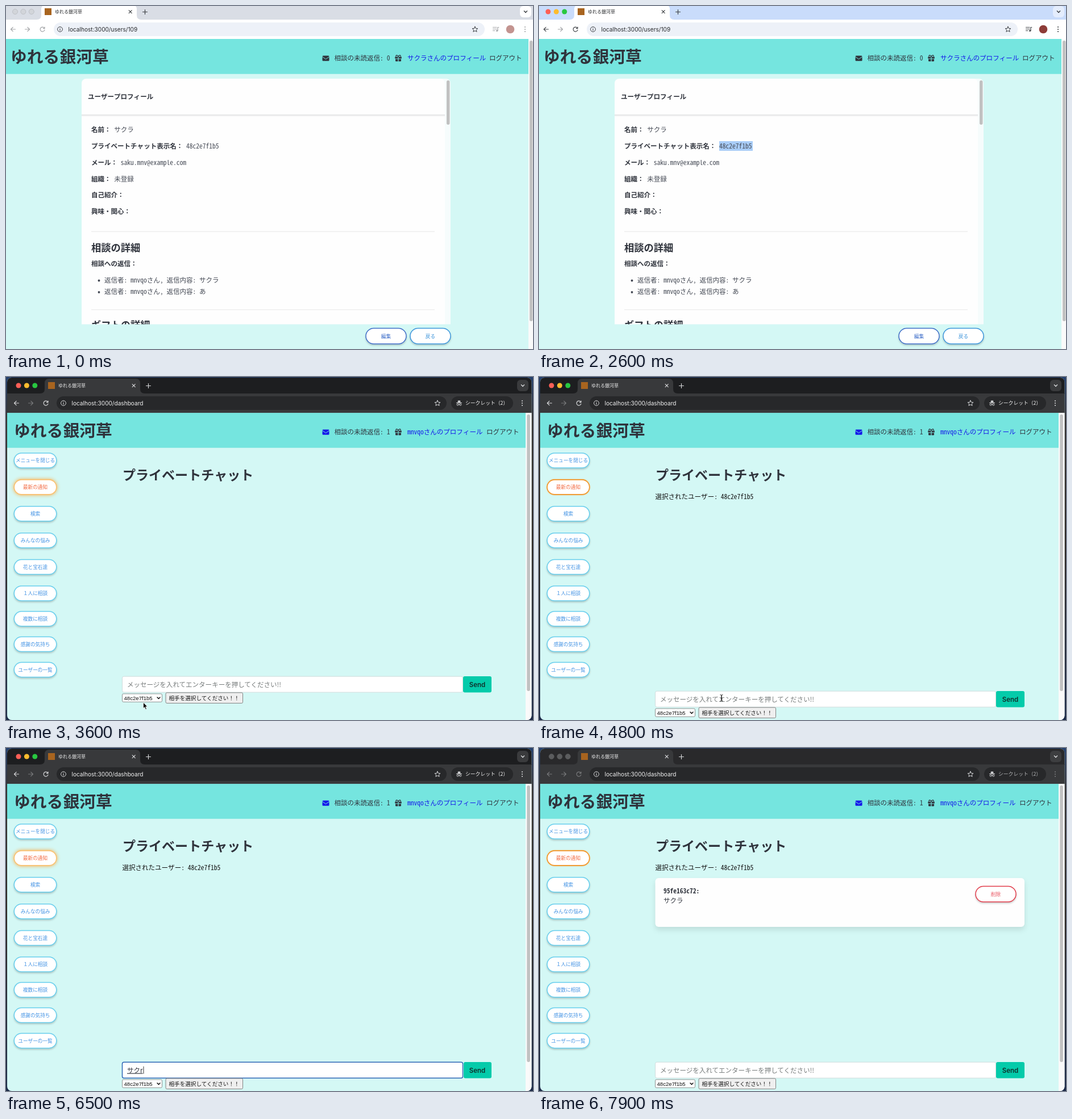
Recreate the animation shown at these times as an HTML page. Size 927x604 px, loop 8000 ms.

```html
<!DOCTYPE html>
<html lang="ja">
<head>
<meta charset="utf-8">
<title>プライベートチャット</title>
<style>
html, body { margin: 0; width: 100%; height: 100%; overflow: hidden; }
svg { display: block; font-family: 'Noto Sans Mono CJK JP', 'Noto Sans CJK JP', 'Noto Sans CJK', sans-serif; }
.ui { font-family: Inter, 'Noto Sans CJK JP', 'Noto Sans CJK', sans-serif; }
.prop { font-family: 'Noto Sans CJK JP', 'Noto Sans CJK', sans-serif; }
.form { font-family: 'Liberation Sans', 'Noto Sans CJK JP', sans-serif; }
.b { font-weight: 700; }
.semi { font-weight: 600; }
.mid { text-anchor: middle; }
.ime { text-decoration: underline; }
.shade { filter: drop-shadow(0 2px 1.5px #0003); }
.lift { filter: drop-shadow(0 5px 5px #0a0a0a1c); }
</style>
</head>
<body>
<svg id="stage" width="927" height="604" viewBox="0 0 927 604"></svg>
<script>
const LOOP = 8000, EM = 11.52;
const SITE = 'ゆれる銀河草', GUEST = 'サクラ', HOST = 'mnvqo';
const GUEST_ID = '48c2e7f1b5', HOST_ID = '95fe163c72', MAIL = 'saku.mnv@example.com';
const INK = '#2f333c', BODY = '#444954', PAGE = '#d4f8f5', BAR = '#75e5df', LINK = '#1519ea';

const rect = (x, y, w, h, fill, r = 0, more = '') =>
  `<rect x="${x}" y="${y}" width="${w}" height="${h}" rx="${r}" fill="${fill}" ${more}/>`;
const dot = (x, y, r, fill, more = '') => `<circle cx="${x}" cy="${y}" r="${r}" fill="${fill}" ${more}/>`;
const line = (d, color, w = 1.2) =>
  `<path d="${d}" fill="none" stroke="${color}" stroke-width="${w}" stroke-linecap="round" stroke-linejoin="round"/>`;
const shape = (d, fill, more = '') => `<path d="${d}" fill="${fill}" ${more}/>`;
const move = (x, y, body) => `<g transform="translate(${x} ${y})">${body}</g>`;
// Text is placed by the middle of its line.
const text = (x, cy, str, size = EM, fill = INK, cls = '') =>
  `<text x="${x}" y="${cy + size * 0.38}" font-size="${size}" fill="${fill}" class="${cls}">${str}</text>`;

const pill = (x, y, w, h, label, edge, ink) =>
  rect(x, y, w, h, '#fff', h / 2, `stroke="${edge}" stroke-width="1.5" class="shade"`) +
  text(x + w / 2, y + h / 2, label, 8.64, ink, 'mid');

const LIGHT = {
  strip: ['#d9dde5', '#c9dcfb'], tab: '#fff', tool: '#fff', field: '#edf1f8', ink: '#3c3f43',
  text: '#26282b', weak: ['#a3a5a8', '#45484c'], off: '#a3a5a8', lamp: '#d2d5da', rim: '#b4b7bc', box: ['#fff', '#e4edfd']
};
const DARK = {
  strip: ['#29292b', '#1d1e20'], tab: '#38393b', tool: '#38393b', field: '#27282a', ink: '#d5d6d8',
  text: '#f0f0f0', weak: ['#77787a', '#d5d6d8'], off: '#77787a', lamp: '#5b5c5e', rim: '#5b5c5e', box: ['#3d3e40', '#3a3b3d']
};

function browserLeft(c, on) {
  const lamps = ['#fe5f57', '#febc2e', '#28c840'].map((f, i) =>
    dot(16 + i * 14.4, 10, 4.5, on ? f : c.lamp, on ? '' : `stroke="${c.rim}" stroke-width=".7"`)).join('');
  return shape('M54 24q8 0 8-8V6q0-8 8-8h152q8 0 8 8v10q0 8 8 8z', c.tab) + lamps +
    rect(68, 4, 12, 12, '#a8641f') +
    text(86, 10, SITE, 8, c.text, 'prop') +
    line('M216.2 7.7l5 5m0-5l-5 5M240.5 10.5h8m-4-4v8', c.ink) +
    line('M16.5 41h-8m3.7-3.7l-3.7 3.7l3.7 3.7', c.weak[on]) +
    line('M33.5 41h8m-3.7-3.7l3.7 3.7l-3.7 3.7', c.off) +
    line('M67.6 39a4 4 0 1 0 .4 3.2M68 37v2.6h-2.6', c.weak[on]);
}

const address = (c, url) => dot(95, 41, 4.4, 'none', `stroke="${c.ink}"`) +
  line('M95 40.8v2.2M95 38.8v.1', c.ink) + text(109.5, 41, url, 10.1, c.text, 'ui');

const star = (x, y, color) => move(x, y,
  line('M0-4.8L1.4-1.6L4.9-1.3L2.3 1L3.1 4.4L0 2.6L-3.1 4.4L-2.3 1L-4.9-1.3L-1.4-1.6Z', color, 1));
const menuDots = (x, y, color) => [-4, 0, 4].map(d => dot(x, y + d, 1.1, color)).join('');
const chevron = (x, y, bg, color) => rect(x - 10, y - 10, 20, 20, bg, 6) +
  line(`M${x - 2.6} ${y - 1.2}l2.6 2.6l2.6-2.6`, color, 1.4);

function siteNav(y, count, user, envelope, logoutX) {
  const mail = rect(-6, -4.6, 12, 9.4, envelope, 1.5) + line('M-6-2.6L0 1.6L6-2.6', BAR, 1);
  const gift = shape('M-5.8-2.4h5.2v3h-5.2zM.6-2.4h5.2v3h-5.2zM-5 1.4h4.4v4.2H-4q-1 0-1-1zM.6 1.4H5v3.2q0 1-1 1H.6z', INK) +
    line('M0-2.6C-1-6-4.6-6.2-4-3.4M0-2.6C1-6 4.6-6.2 4-3.4', INK, 1.3);
  return move(562.5, y, mail) + text(577.5, y, '相談の未読返信: ' + count) + move(690, y, gift) +
    text(706, y, user + 'さんのプロフィール', EM, LINK) + text(logoutX, y, 'ログアウト');
}

function profile(t) {
  const on = +(t >= 1500), c = LIGHT;
  const row = (y, label, value = '') => text(150, y, label + '：', EM, INK, 'b') +
    text(150 + EM * (label.length + 1.5), y, value, EM, BODY);
  const reply = (y, body) => dot(163.5, y + 1, 1.9, BODY) +
    text(173, y, `返信者: ${HOST}さん, 返信内容: ${body}`, EM, BODY);
  return rect(0, 0, 927, 604, PAGE) +
    rect(0, 0, 927, 24, c.strip[on]) + rect(0, 24, 927, 34, c.tool) + rect(84, 29, 758, 24, c.field, 12) +
    browserLeft(c, on) + address(c, 'localhost:3000/users/109') +
    chevron(914, 10, c.box[on], c.ink) + star(825, 41, c.ink) +
    line('M856.5 37.5h6.5M856.5 40.5h6.5M856.5 43.5h3.5M865 43.5v-6h1.8', c.weak[on]) + dot(863.6, 43.5, 1.6, c.weak[on]) +
    dot(887, 41, 7.3, on ? '#8d3c38' : '#c39490') + menuDots(913, 41, c.weak[on]) +
    rect(0, 58, 919, 61.7, BAR) + rect(919, 58, 8, 546, '#fafafa') + rect(921, 61, 5.5, 494, '#c1c1c1', 2.7) +
    text(8, 89, SITE, 28.8, INK, 'b') + siteNav(92, 0, GUEST, INK, 850) +
    rect(140, 128, 642, 440, '#f6fcfc', 8) + rect(133, 128, 639, 440, '#fefefe', 8) +
    rect(775, 131, 5.5, 78, '#c1c1c1', 2.7) +
    rect(133, 191, 639, 2, '#e6e7e8') + rect(133, 193, 639, 1.5, '#f5f5f6') +
    text(144, 160, 'ユーザープロフィール', EM, INK, 'b') +
    (t >= 1800 ? rect(317, 238, 59, 17, '#a9cdf8') : '') +
    row(217.5, '名前', GUEST) + row(246.5, 'プライベートチャット表示名', GUEST_ID) + row(275.5, 'メール', MAIL) +
    row(304.5, '組織', '未登録') + row(333, '自己紹介') + row(362, '興味・関心') +
    rect(150, 396.5, 604, 1.4, '#ededed') + text(150, 425, '相談の詳細', 17.28, INK, 'b') +
    row(453.5, '相談への返信') + reply(482.5, GUEST) + reply(503, 'あ') +
    rect(150, 534, 604, 1.4, '#ededed') + text(150, 561, 'ギフトの詳細', 17.28, INK, 'b') +
    rect(133, 560.5, 650, 44, PAGE) +
    pill(633, 567.5, 71, 27.5, '編集', '#3f6fc9', '#3a6bc8') + pill(711, 567.5, 71, 27.5, '戻る', '#3d97dc', '#3a93da');
}

const MENU = ['メニューを閉じる', '最新の通知', '検索', 'みんなの悩み', '花と宝石達', '１人に相談', '複数に相談', '感謝の気持ち', 'ユーザーの一覧'];

function menuButton(label, i, t) {
  const y = i < 5 ? 134 + i * 46.9 : 368 + (i - 5) * 44.8;
  if (i != 1) return pill(14.3, y, 74.5, 26, label, '#68cfee', '#4393e4');
  const glow = 0.5 + 0.5 * Math.cos((t - 3500) / 3000 * 2 * Math.PI);
  const halo = `style="filter:drop-shadow(0 0 ${1 + 2 * glow}px rgba(255,165,50,${0.6 + 0.3 * glow}))"`;
  return rect(14.3, y, 74.5, 26, '#fff', 13, `stroke="rgb(${242 + 8 * glow},${146 + 48 * glow},${35 + 80 * glow})" stroke-width="1.6" ${halo}`) +
    text(51.5, y + 13, label, 8.64, '#f2683f', 'mid');
}

const TYPING = [[5700, 's'], [5850, 'サ'], [6100, 'サk'], [6250, 'サク'], [6450, 'サクr'], [6650, GUEST], [7250, '']];

function composer(t) {
  const cy = t < 4600 ? 541.2 : 567.2, focus = t >= 5200 && t < 7700;
  const typed = (TYPING.filter(k => t >= k[0]).pop() || [0, ''])[1];
  const width = [...typed].reduce((w, ch) => w + (ch < '~' ? 5 : EM), 0);
  return rect(204.5, cy - 14, 599, 28, '#fff', 3, `stroke="${focus ? '#2d66b5' : '#cfdcdc'}" stroke-width="${focus ? 1.5 : 1}"`) +
    rect(focus ? 805 : 804, cy - 14.2, focus ? 49 : 50, 28.6, '#04cbaa', 3) + text(829, cy, 'Send', 11.5, '#10302c', 'ui semi mid') +
    (typed ? text(213, cy, typed, EM, INK, 'prop' + (t < 6950 ? ' ime' : ''))
      : text(213, cy, 'メッセージを入れてエンターキーを押してください!!', EM, '#767b7b', 'prop')) +
    (focus && (typed || t % 1000 < 500) ? rect(213.5 + width, cy - 6.5, 0.9, 13, '#222') : '') +
    rect(204.5, cy + 16.7, 70, 14.3, '#fff', 2, 'stroke="#767676" stroke-width=".8"') +
    text(207.5, cy + 23.8, GUEST_ID, 9.6, '#111', 'form') + line(`M266 ${cy + 22.8}l2.5 2.5l2.5-2.5`, '#111', 1.5) +
    rect(281, cy + 14.7, 135.5, 18.5, '#efefef', 2, 'stroke="#767676" stroke-width=".9"') +
    text(286.5, cy + 23.8, '相手を選択してください！！', 9.6, '#111', 'prop');
}

const message = () => rect(204.5, 229, 649.5, 86, '#fefefe', 6, 'class="lift"') +
  text(219, 252, HOST_ID + ':', EM, INK, 'b') + text(219, 268.5, GUEST, EM, INK) +
  pill(768, 243.5, 71, 27.5, '削除', '#e23c4b', '#e8505d');

function wallpaper() {
  return '<linearGradient id="wall" x2="0" y2="1"><stop stop-color="#24406e"/><stop offset=".12" stop-color="#33302f"/>' +
    '<stop offset=".5" stop-color="#2a2420"/><stop offset="1" stop-color="#1c2a48"/></linearGradient>' +
    rect(0, 0, 927, 604, 'url(#wall)');
}

function chat(t) {
  const on = +(t < 7700), c = DARK;
  const spy = shape('M-2.6-1.2L-2-4.4h4l.6 3.2zM-5-1H5V0H-5z', c.ink) +
    dot(-2.4, 2.5, 1.6, 'none', `stroke="${c.ink}"`) + dot(2.4, 2.5, 1.6, 'none', `stroke="${c.ink}"`) + line('M-.8 2.3h1.6', c.ink, 1);
  return wallpaper() +
    '<clipPath id="win"><rect x="2" y="1" width="922.5" height="603" rx="8"/></clipPath><g clip-path="url(#win)">' +
    rect(2, 1, 923, 603, PAGE) + rect(2, 1, 923, 29, c.strip[on]) + rect(2, 29, 923, 34.5, c.tool) +
    rect(89, 34, 686, 24, c.field, 12) + rect(783, 34, 109, 24, c.field, 12) +
    move(6, 5, browserLeft(c, on) + address(c, 'localhost:3000/dashboard')) +
    chevron(909, 15, c.box[on], c.ink) + star(759, 46, c.ink) + move(797, 46, spy) +
    text(808, 46, 'シークレット（2）', 8.8, on ? c.text : '#b0b1b3', 'prop') + menuDots(908, 46, c.weak[on]) +
    rect(2, 63.2, 912, 61.5, BAR) + rect(914, 63.2, 11, 541, '#fafafa') + rect(916.3, 66, 5.5, 487, '#c1c1c1', 2.7) +
    text(14, 94, SITE, 28.8, INK, 'b') + siteNav(97, 1, HOST, LINK, 845) +
    MENU.map((label, i) => menuButton(label, i, t)).join('') +
    text(205, 172.5, 'プライベートチャット', 23.04, INK, 'b') +
    (t >= 4600 ? text(204.5, 211, '選択されたユーザー: ' + GUEST_ID, EM, '#111') : '') +
    (t >= 7300 ? message() : '') + composer(t) + '</g>';
}

// Pointer paths: [time, x, y]
const PATHS = [
  [[950, 420, 380], [1150, 322, 262], [1300, 322, 262], [1550, 346, 246], [2300, 346, 246]],
  [[2900, 380, 480], [3400, 241.5, 573], [3800, 241.5, 573], [4200, 345, 566], [4550, 345, 566], [4750, 321, 565], [5600, 321, 565]]
];

function pointer(t) {
  for (const path of PATHS) for (let i = 1; i < path.length; i++) {
    const [t0, x0, y0] = path[i - 1], [t1, x1, y1] = path[i];
    if (t < t0 || t >= t1) continue;
    const u = (t - t0) / (t1 - t0), e = u * u * (3 - 2 * u);
    const beam = (t > 1480 && t < 2400) || t > 4680;
    return move(x0 + (x1 - x0) * e, y0 + (y1 - y0) * e, beam
      ? line('M-2-5.5q2 0 2 1.5v8q0 1.5-2 1.5M2-5.5q-2 0-2 1.5v8q0 1.5 2 1.5M-1.2 1.5h2.4', '#222', 1)
      : shape('M0 0v10.6l2.4-2.2l1.7 4l1.8-.8l-1.7-3.9h3.2z', '#000', 'stroke="#fff" stroke-width=".8"'));
  }
  return '';
}

const stage = document.getElementById('stage');
let shown = '';
function draw(now) {
  const t = now % LOOP;
  const next = (t < 2700 ? profile(t) : chat(t)) + pointer(t);
  if (next !== shown) stage.innerHTML = shown = next;
}
const start = performance.now();
function tick() {
  draw(performance.now() - start);
  requestAnimationFrame(tick);
}
tick();
</script>
</body>
</html>
```
